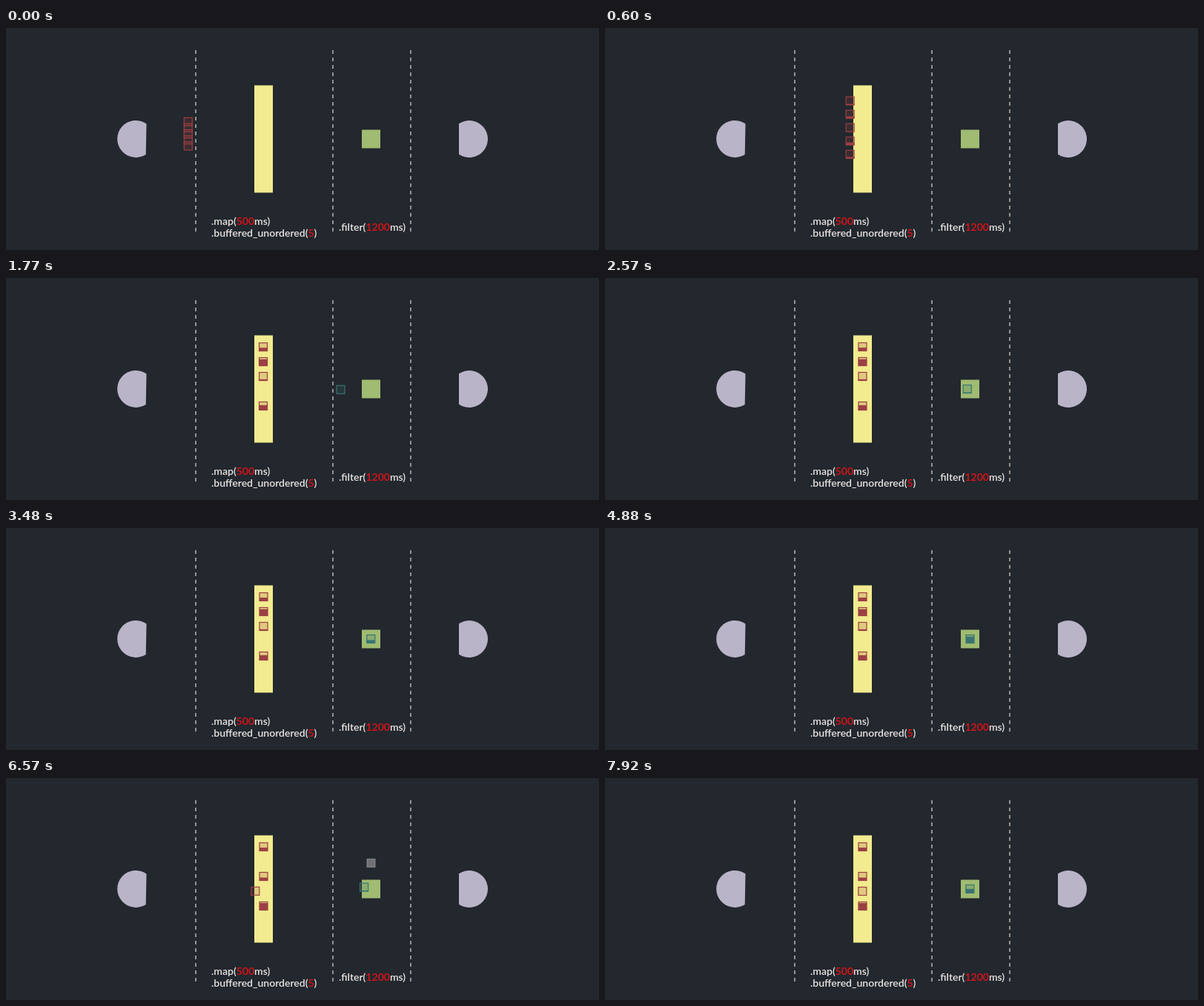
An HTML page with a canvas for the animation above (8 s loop, 800 px wide and 300 px high).

```html
<!DOCTYPE html>
<html lang="en">
<head>
<meta charset="utf-8">
<title>Buffered stream</title>
<style>
  html, body { margin: 0; width: 100%; height: 100%; overflow: hidden; background: #23272e; }
  svg, canvas { position: absolute; left: 0; top: 0; }
  text { font: 600 14px Lato, sans-serif; fill: #e9e7e4; }
  tspan { fill: #e31216; }
</style>
</head>
<body>
<svg width="800" height="300">
  <g fill="#bab4c8">
    <path d="M189.5 129.4A25 25 0 1 0 188.7 170.9Z"/>
    <path d="M611 129.3A25 25 0 1 1 611 170.7Z"/>
  </g>
  <path d="M256 30V275M441 30V275M546 30V275" stroke="#b3afa9" stroke-width="1.6" stroke-dasharray="5 5"/>
  <rect x="335" y="77.5" width="25" height="145" fill="#f2eb8f"/>
  <rect x="480" y="137.5" width="25" height="25" fill="#a0bb72"/>
  <text x="277" y="265.5">.map(<tspan>500</tspan>ms)</text>
  <text x="277" y="281.5">.buffered_unordered(<tspan>5</tspan>)</text>
  <text x="449" y="273.5">.filter(<tspan>1200</tspan>ms)</text>
</svg>
<canvas width="800" height="300"></canvas>
<script>
const ctx = document.querySelector('canvas').getContext('2d');
const LOOP = 8000;
const RED = [155, 64, 68], TEAL = [58, 116, 113], GRAY = [190, 190, 190];
const SOURCE = [175, 150], FILTER = [492.5, 150], REJECTED = [492.5, 112.5];
const slot = i => [347.5, 93 + 20 * i];

const FIRST_PULL = -175, FIRST_DONE = 1350, SECOND_PULL = 5660, RESUME = 5720;
const early = [.4, .8, .15, 1, .6], late = [.4, 0, .36, 0, .86];
const holds = [3200, 3480, 4000, 4880];

const clamp = v => Math.min(1, Math.max(0, v));
const ramp = (t, start, length) => clamp((t - start) / length);
const mix = (a, b, p) => a.map((v, i) => v + (b[i] - v) * p);
const decay = (t, start) => 1 - Math.exp(-3 * Math.max(0, t - start) / 1000);

function box([x, y], color, level, alpha = 1) {
  const paint = `rgb(${color.map(Math.round)})`, r = 5.5;
  ctx.fillStyle = ctx.strokeStyle = paint;
  ctx.lineWidth = 1.2;
  ctx.globalAlpha = alpha * .2;
  ctx.fillRect(x - r, y - r, 2 * r, 2 * r);
  ctx.globalAlpha = alpha;
  ctx.fillRect(x - r, y + r - 2 * r * level, 2 * r, 2 * r * level);
  ctx.strokeRect(x - r, y - r, 2 * r, 2 * r);
}

// The picture stands still between these moments while the filter is busy.
function heldTime(t) {
  if (t < holds[0] || t >= RESUME) return t;
  return holds.filter(h => h <= t).pop();
}

function draw(t) {
  ctx.clearRect(0, 0, 800, 300);
  const resumed = t >= RESUME;
  const arrive = decay(t, FIRST_PULL), work = ramp(t, 250, 1100);

  for (let i = 0; i < 5; i++) {
    if (i === 3 && t >= FIRST_DONE || i === 1 && resumed) continue;
    box(mix(SOURCE, slot(i), arrive), RED, resumed ? late[i] : early[i] * work);
  }

  if (t >= FIRST_DONE && !resumed) {
    const p = decay(t, FIRST_DONE);
    box(mix(slot(3), FILTER, p), mix(RED, TEAL, clamp(p * 2)), ramp(t, 2240, 3300));
  }

  if (resumed) {
    const p = decay(t, SECOND_PULL);
    const fade = 1 - ramp(t, SECOND_PULL, 1640);
    box(mix(SOURCE, slot(3), p), RED, 0);
    box(mix(slot(1), FILTER, p), mix(RED, TEAL, clamp(p * 2)), ramp(t, 6250, 3300));
    if (fade > 0) box(mix(FILTER, REJECTED, p), mix(TEAL, GRAY, clamp(p * 2)), 1, fade);
  }
}

function tick() {
  draw(heldTime(performance.now() % LOOP));
  requestAnimationFrame(tick);
}
tick();
</script>
</body>
</html>
```
